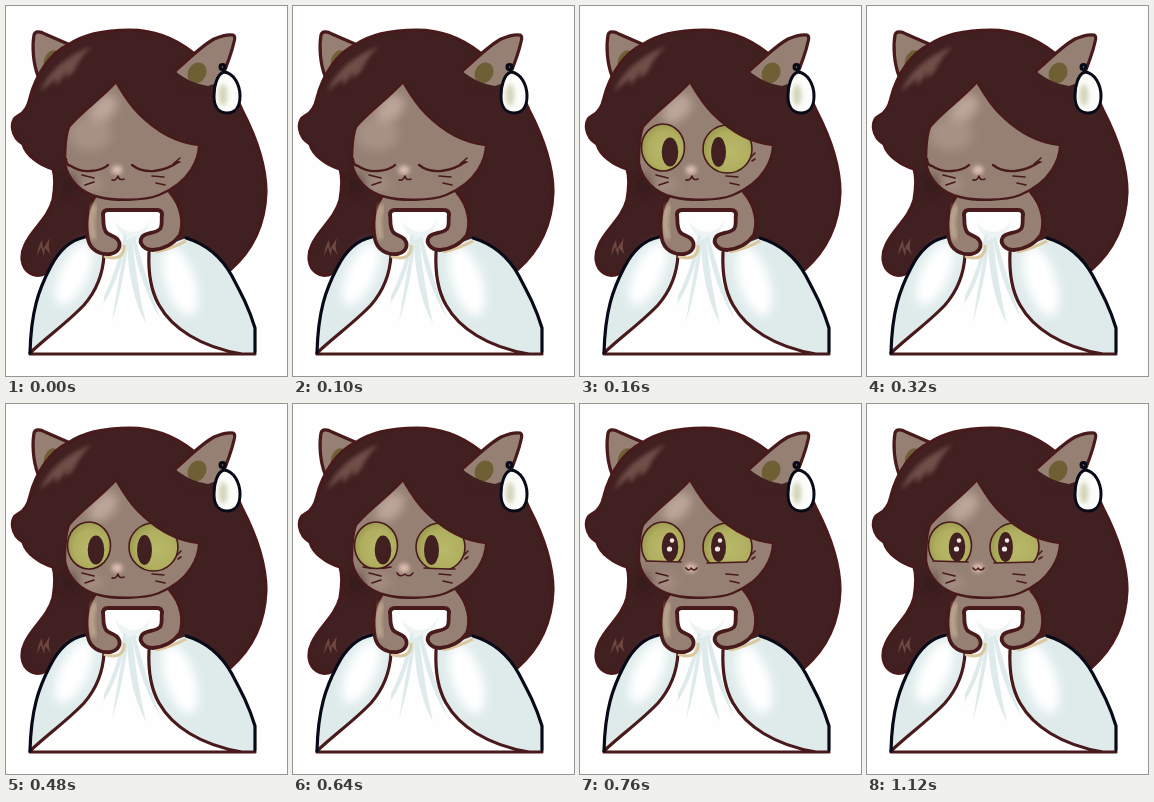
Write an HTML page that moves like this. It is 281x370 px and loops after 1360 ms.

```html
<!DOCTYPE html>
<html lang="en">
<head>
<meta charset="utf-8">
<title>Blinking cat in a white dress</title>
<style>
  html, body { margin: 0; width: 100%; height: 100%; overflow: hidden; background: #fefefe; }
  svg { display: block; width: 281px; height: 370px; }
  .line { fill: none; stroke: #481a1b; stroke-linecap: round; stroke-linejoin: round; }
  .thin { stroke-width: 1.6; }
  .mid { stroke-width: 3.2; }
  .bold { stroke-width: 3.8; }
  .ink { stroke: #080a18; }
  .skin { fill: #968074; }
  .hair { fill: #412021; }
  .olive { fill: #6f5f35; }
  .pose { visibility: hidden; }
</style>
</head>
<body>
<svg viewBox="0 0 281 370">
  <defs>
    <filter id="soft0"><feGaussianBlur stdDeviation=".45"/></filter>
    <filter id="soft2" x="-50%" y="-50%" width="200%" height="200%"><feGaussianBlur stdDeviation="2"/></filter>
    <filter id="soft5" x="-80%" y="-80%" width="260%" height="260%"><feGaussianBlur stdDeviation="5"/></filter>
    <radialGradient id="iris" cx=".55" cy=".55" r=".6">
      <stop offset="0" stop-color="#b9b96a"/><stop offset=".65" stop-color="#b0af5f"/><stop offset="1" stop-color="#96944c"/>
    </radialGradient>
    <path id="hairShape" d="M62 39C76 29 98 24 124 24C148 24 167 31 186 46L216 70C224 78 230 90 236 104C250 131 260 160 260 186C259 218 246 245 224 264L200 275H60L40 267C34 270 28 270 24 267C15 262 14 249 19 239C25 224 42 213 47 194C49 182 50 172 47 163C33 159 20 149 17 138C5 131 3 115 12 110C18 107 22 101 24 92C30 68 45 47 62 39Z"/>
    <path id="faceShape" d="M110 76C97 91 73 108 63 121C59 131 59 145 59 157C62 174 75 187 93 191C108 195 138 195 153 189C168 183 178 175 185 164C190 156 193 148 193 139C170 137 149 124 133 108C122 97 116 86 110 76Z"/>
    <clipPath id="faceClip"><use href="#faceShape"/></clipPath>
    <clipPath id="hairClip"><use href="#hairShape"/></clipPath>
    <path id="panelL" d="M79 231C64 234 52 246 44 262C33 283 25 305 24 347C42 330 62 316 78 299C91 284 97 268 98 249Z"/>
    <path id="panelR" d="M143 246C142 268 145 285 153 299C166 322 194 341 236 348H249V322C243 302 235 287 226 270C216 252 200 238 180 232Z"/>
    <clipPath id="clipL"><use href="#panelL"/></clipPath>
    <clipPath id="clipR"><use href="#panelR"/></clipPath>
    <clipPath id="lifted"><path d="M50 105H185V168Q150 164 122 165L104 164Q84 166 62 163L50 160Z"/></clipPath>
    <clipPath id="happy"><path d="M50 105H185V158L122 159L104 158L50 156Z"/></clipPath>
    <g id="eyes">
      <g class="line thin">
        <ellipse cx="83" cy="141.5" rx="21.5" ry="23.5" fill="url(#iris)"/>
        <ellipse cx="147.5" cy="143" rx="24.5" ry="24" fill="url(#iris)"/>
      </g>
    </g>
    <g id="pupils" class="hair">
      <ellipse cx="90" cy="146" rx="8.3" ry="14.5"/>
      <ellipse cx="138.5" cy="146" rx="7.5" ry="15"/>
    </g>
  </defs>

  <g filter="url(#soft0)">
    <!-- left ear and hair -->
    <path class="skin" d="M32 74C27 58 26 40 28 29C29 25 34 25 39 28L64 38L50 66Z"/>
    <ellipse class="olive" cx="46" cy="55" rx="8" ry="11" transform="rotate(20 46 55)"/>
    <path class="line mid" d="M32 70C27 57 26 40 28 29C29 25 34 25 39 28L62 38"/>
    <use href="#hairShape" class="hair"/>
    <g clip-path="url(#hairClip)">
      <path d="M34 86Q46 56 86 40Q74 51 68 65L60 73L61 65L50 80L50 72Z" fill="#8a675f" opacity=".65" filter="url(#soft2)"/>
      <path d="M31 250Q32 240 36 234L37 243L44 232Q41 241 45 249L39 242L38 250L35 241Z" fill="#80584e" opacity=".7"/>
    </g>
    <use href="#hairShape" class="line mid"/>

    <!-- right ear and earring -->
    <path class="skin" d="M169 65C182 54 195 40 208 33C215 30 221 28 227 29C229 30 229 33 228 36C225 50 219 64 214 76C203 86 184 84 169 65Z"/>
    <ellipse class="olive" cx="191" cy="67" rx="9" ry="11" transform="rotate(30 191 67)"/>
    <path class="hair" d="M168 64C178 73 190 78 202 80L216 75L214 92L176 84Z"/>
    <path class="line mid" d="M169 65C182 54 195 40 208 33C215 30 221 28 227 29C229 30 229 33 228 36C225 50 219 64 214 76"/>
    <circle class="line mid ink" cx="216.5" cy="61" r="2.4"/>
    <path class="ink" d="M218 66C228 67 234 79 234 90C234 101 229 107 221 107C212 107 208 100 208 90C208 80 211 68 218 66Z" fill="#fcfdfa" stroke-width="3"/>
    <ellipse cx="217" cy="89" rx="4.5" ry="11" fill="#c3c5a0" opacity=".7" filter="url(#soft2)"/>

    <!-- body and dress -->
    <path class="skin" d="M92 184H164C174 195 178 207 177 219L170 238H84C79 220 79 201 92 184Z"/>
    <path d="M98 205H155V225L143 246L153 299L249 348H24L78 299L98 249L97 225Z" fill="#fefefe"/>
    <g fill="#dfebeb">
      <path d="M118 228Q112 262 98 290Q99 298 93 304Q114 276 121 230Z"/>
      <path d="M120 234Q113 270 106 316Q117 280 123 234Z"/>
      <path d="M121 234Q122 285 140 318Q131 280 126 232Z"/>
      <path d="M126 232Q134 280 154 312Q139 270 129 230Z"/>
      <path d="M109 216Q118 226 128 226Q138 225 145 214Q139 232 127 236Q115 234 109 216Z" opacity=".5"/>
    </g>
    <use href="#panelL" fill="#dfebeb"/>
    <use href="#panelR" fill="#dfebeb"/>
    <g fill="#fff" filter="url(#soft5)">
      <g clip-path="url(#clipL)"><ellipse cx="68" cy="268" rx="14" ry="34" transform="rotate(25 68 268)"/></g>
      <g clip-path="url(#clipR)"><ellipse cx="174" cy="275" rx="15" ry="36" transform="rotate(-18 174 275)"/></g>
    </g>
    <path class="line mid" d="M24 348H249M98 249C97 268 91 284 78 299C62 316 42 330 24 347M143 246C142 268 145 285 153 299C166 322 194 341 236 348"/>
    <path class="line mid ink" d="M79 231C64 234 52 246 44 262C33 283 25 305 24 347M180 232C200 238 216 252 226 270C235 287 243 302 249 322V346"/>
    <path d="M98 250Q108 254 114 250Q119 246 118 239M150 246Q165 243 180 235" fill="none" stroke="#dcc69c" stroke-width="3"/>

    <!-- arms -->
    <g class="line bold">
      <path class="skin" d="M92 186C79 201 79 220 82 233C84 244 94 249 104 248C112 247 116 240 112 234C109 229 103 230 100 226C96 220 98 213 97 208"/>
      <path class="skin" d="M164 186C177 201 178 218 174 229C167 239 156 243 147 244C138 244 132 237 136 231C140 226 149 228 154 223C157 219 155 212 156 208"/>
      <path d="M97 209Q97 204 102 204H151Q156 204 156 209"/>
    </g>
    <path d="M89 199Q82 215 88 233" fill="none" stroke="#d8c3a2" stroke-width="6" opacity=".6" filter="url(#soft2)"/>

    <!-- face -->
    <use href="#faceShape" class="skin"/>
    <g clip-path="url(#faceClip)">
      <ellipse cx="97" cy="103" rx="17" ry="11" transform="rotate(-45 97 103)" fill="#d5bfb2" opacity=".6" filter="url(#soft5)"/>
      <ellipse cx="81" cy="178" rx="17" ry="8" fill="#b8a294" opacity=".4" filter="url(#soft5)"/>
      <g class="pose" data-poses="0 2">
        <ellipse cx="84" cy="128" rx="22" ry="17" fill="#b8a195" opacity=".5" filter="url(#soft5)"/>
      </g>
      <g class="pose" data-poses="1 3"><use href="#eyes"/><use href="#pupils"/></g>
      <g class="pose" data-poses="4">
        <g clip-path="url(#lifted)"><use href="#eyes"/><use href="#pupils"/></g>
        <path class="line thin" d="M70 163Q84 166 98 163M131 164Q150 165 162 165"/>
      </g>
      <g class="pose" data-poses="5">
        <g clip-path="url(#happy)"><use href="#eyes"/><use href="#pupils" y="-3"/></g>
        <path class="line thin" d="M66 157L101 158M127 159L167 158"/>
        <g fill="#f6eae6">
          <circle cx="92" cy="136.5" r="2.2"/><circle cx="89.5" cy="145" r="2.6"/>
          <circle cx="140" cy="136.5" r="2.2"/><circle cx="137.5" cy="145" r="2.6"/>
        </g>
      </g>
    </g>
    <ellipse cx="64" cy="179" rx="9" ry="10" fill="#2b1516" opacity=".5" filter="url(#soft5)"/>
    <use href="#faceShape" class="line" stroke-width="2.4"/>

    <g class="pose line" data-poses="0 2" stroke-width="2.4">
      <path d="M60 153Q60 159 65 160Q74 166 85 165Q97 164 102 159M126 159Q135 166 148 165Q163 163 172 156"/>
      <path class="thin" d="M64 160L59 157M167 158L174 152M170 157L174 156"/>
    </g>
    <path class="pose line thin" data-poses="1 3 4 5" d="M171 151L175 147M172 155L175 153"/>

    <!-- nose, mouth, whiskers -->
    <ellipse cx="111" cy="164" rx="5.5" ry="4.5" fill="#f0cfc0" opacity=".8" filter="url(#soft2)"/>
    <path class="line thin" d="M76 169L88 172M79 179L88 176M146 170L158 171M150 177L159 179"/>
    <g class="line thin">
      <path class="pose" data-poses="0 1 2 3" d="M106 174Q110 175 112 170Q113 175 118 173"/>
      <path class="pose" data-poses="4" d="M104 169Q107 174 112 170Q116 174 120 169"/>
      <path class="pose" data-poses="5" d="M106 164Q109 168 111 164Q114 168 117 164"/>
    </g>
  </g>
</svg>
<script>
  const holds = [160, 160, 160, 160, 120, 600];
  const duration = holds.reduce((sum, ms) => sum + ms, 0);

  function showDuring(el) {
    const poses = el.dataset.poses.split(' ').map(Number);
    const visibility = i => poses.includes(i) ? 'visible' : 'hidden';
    let time = 0;
    const steps = holds.map((ms, i) => {
      const step = { offset: time / duration, visibility: visibility(i), easing: 'step-end' };
      time += ms;
      return step;
    });
    steps.push({ offset: 1, visibility: visibility(holds.length - 1) });
    el.animate(steps, { duration, iterations: Infinity }).startTime = 0;
  }

  document.querySelectorAll('.pose').forEach(showDuring);
</script>
</body>
</html>
```
